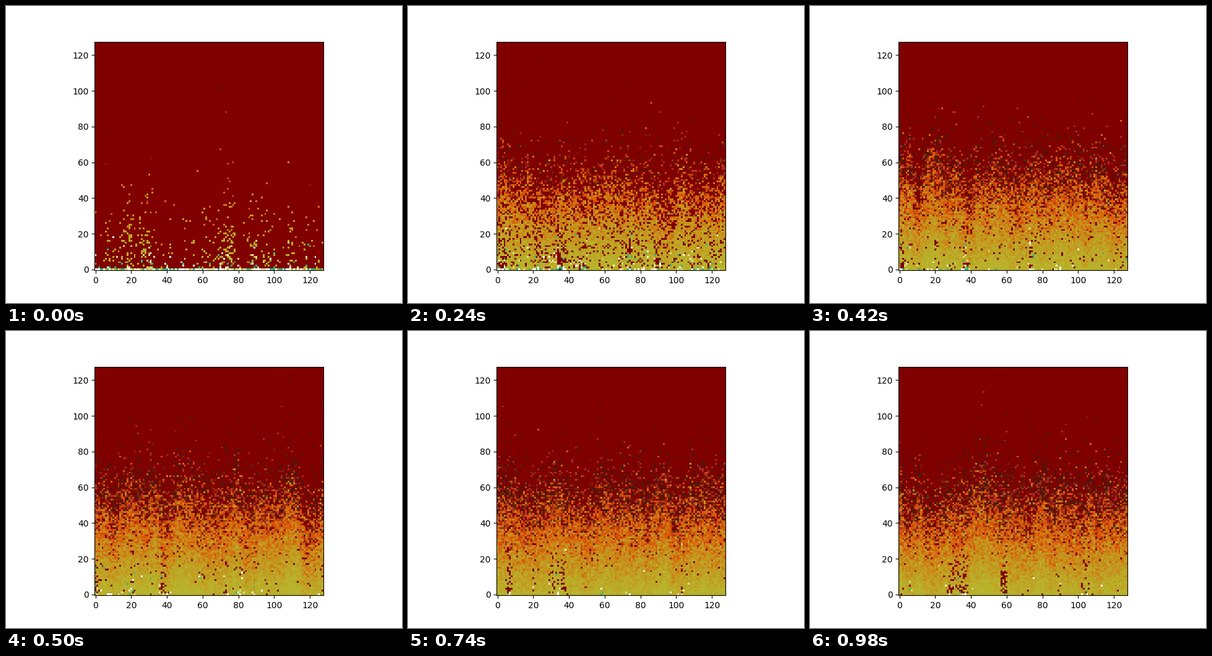
A matplotlib script that plays this animation: 640x480 px, repeating every 1000 ms.

```python
import numpy as np
import matplotlib.pyplot as plt
from matplotlib.animation import FuncAnimation

SIZE, FRAMES, INTERVAL = 128, 50, 20
rng = np.random.default_rng(12)
y = np.arange(SIZE)[:, None]

MAROON = (128, 0, 0)
BROWN = (165, 42, 42)
HOT = np.array([(255, 255, 255), (226, 222, 150), (60, 179, 113)])

# Flame colour as it cools: olive, gold, orange, ember, soot, maroon
COOL_AT = [0, 22, 42, 50, 64, 82, 105]
COOL_RGB = np.array([(184, 180, 44), (198, 146, 28), (222, 86, 8),
                     (200, 64, 8), (80, 28, 10), (68, 24, 10), (115, 4, 2)])


def settle(step, start, end, pace):
    """Ease exponentially from start to end."""
    return end + (start - end) * np.exp(-step / pace)


def smooth_noise(width=2.5, reach=8):
    kernel = np.exp(-(np.arange(-reach, reach + 1) / width) ** 2)
    padded = np.pad(rng.normal(size=SIZE), reach, mode="wrap")
    noise = np.convolve(padded, kernel, "valid")
    return noise / np.sqrt((kernel ** 2).sum())


def drift(field, memory):
    return memory * field + np.sqrt(1 - memory ** 2) * smooth_noise()


def refresh(old, new, rate):
    return np.where(rng.random(old.shape) < rate, new, old)


def flame_colours(loss):
    rgb = np.stack([np.interp(loss, COOL_AT, c) for c in COOL_RGB.T], -1)
    brown = (loss > 50) & (loss < 95) & (rng.random(loss.shape) < .2)
    rgb[brown] = BROWN
    return rgb


def burning_cells(step, luck, tongues, fuel):
    density = settle(step, .38, 1, 7)
    spread = settle(step, 13, 9, 8)
    top = settle(step, -2, 61, 9) + settle(step, 12, 5, 8) * tongues
    gaps = .5 * np.clip(fuel - .8, 0, 1) * np.exp(-(y / 20) ** 2)
    cover = density * (1 - gaps) / (1 + np.exp((y - top) / spread))
    cover[0] = .97
    return luck < cover


def hot_cells(step, fuel):
    evenness = settle(step, 1, 0, 14)
    clump = evenness + (1 - evenness) * 2 * np.clip(fuel, 0, None)
    chance = settle(step, .75, .03, 9) * np.exp(-y / 6) * clump
    chance[0] = settle(step, .85, 0, 18) * clump
    return rng.random(chance.shape) < chance


def paint(step, luck, jitter, tongues, fuel):
    loss = settle(step, .78, 1.16, 16) * y - 3 * tongues
    rgb = flame_colours(loss * (1 + .18 * jitter) + 5 * jitter)

    hot = hot_cells(step, fuel)
    rgb[hot] = HOT[rng.choice(len(HOT), hot.sum(), p=[.4, .35, .25])]
    rgb[~burning_cells(step, luck, tongues, fuel)] = MAROON
    return rgb.astype(np.uint8)


def burn():
    luck = rng.random((SIZE, SIZE))
    jitter = rng.normal(size=luck.shape)
    tongues, fuel = smooth_noise(), smooth_noise()
    for step in range(FRAMES):
        yield paint(step, luck, jitter, tongues, fuel)
        luck = refresh(luck, rng.random(luck.shape), .4)
        jitter = refresh(jitter, rng.normal(size=luck.shape), .5)
        tongues = drift(tongues, .85)
        fuel = drift(fuel, .97)


pictures = list(burn())
fig, ax = plt.subplots(figsize=(6.4, 4.8), dpi=100)
image = ax.imshow(pictures[0], origin="lower", interpolation="nearest")


def update(step):
    image.set_data(pictures[step])
    return [image]


anim = FuncAnimation(fig, update, frames=FRAMES, interval=INTERVAL,
                     repeat=True, repeat_delay=0)
plt.show()
```
